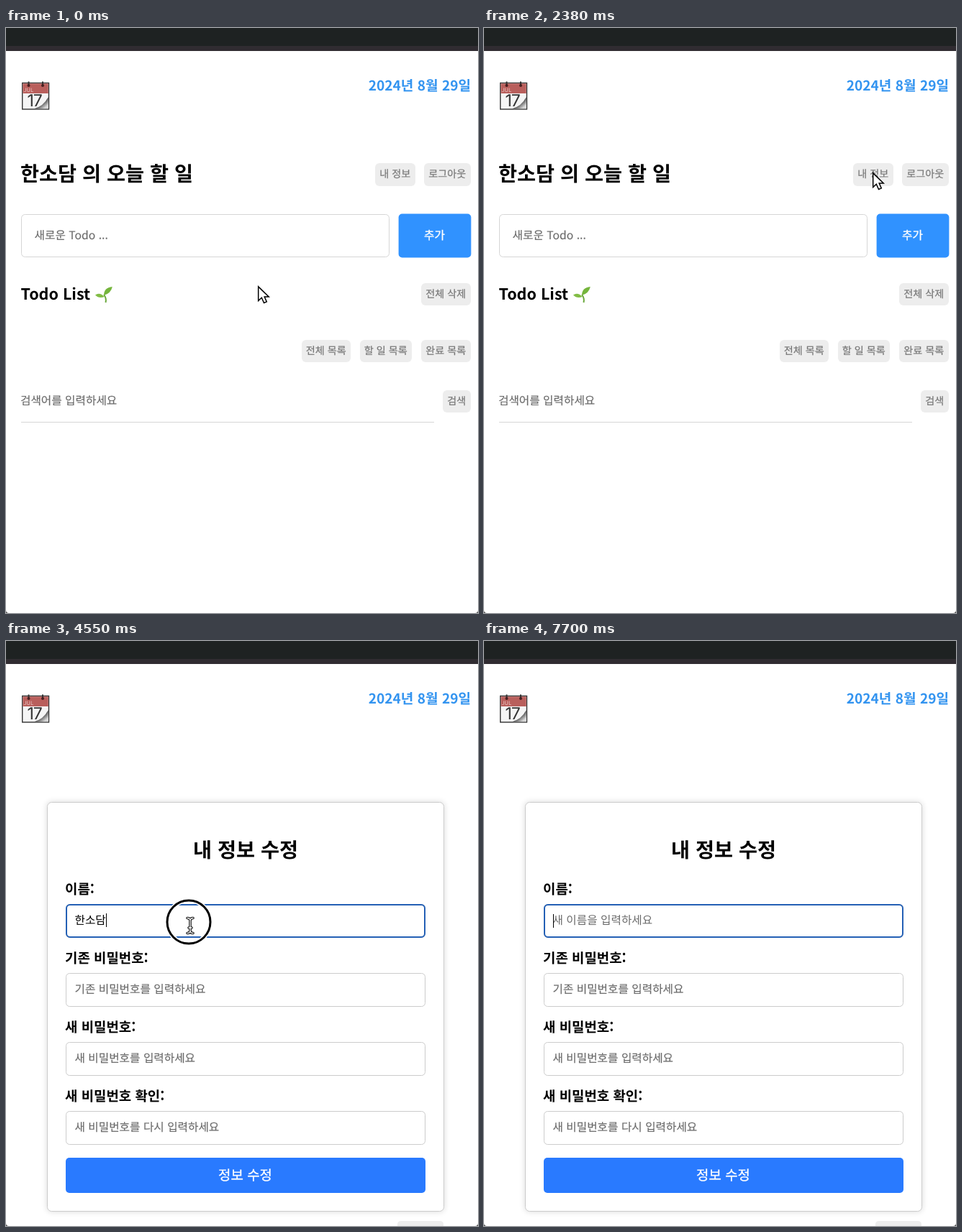
Recreate the animation shown at these times as an HTML page. Size 656 by 814 pixels, loop 8000 ms.

```html
<!DOCTYPE html>
<html lang="ko">
<head>
<meta charset="utf-8">
<title>Todo</title>
<style>
html, body { margin: 0; width: 100%; height: 100%; overflow: hidden; background: #fff; }
svg { display: block; font-family: "Noto Sans CJK KR", "Noto Sans CJK", "Noto Sans CJK JP", sans-serif; }
text { text-rendering: geometricPrecision; }
.bold { font-weight: 700; }
.hint { font-size: 15.7px; fill: #6b6b6b; stroke: #6b6b6b; stroke-width: .15; }
.small { font-size: 14.15px; fill: #777; stroke: #777; stroke-width: .2; text-anchor: middle; }
.label { font-size: 18.9px; font-weight: 700; }
.head { font-size: 28.3px; font-weight: 700; }
.field { fill: #fff; stroke: #ccc; }
.focus { fill: none; stroke: #2460b5; stroke-width: 2; }
.center { text-anchor: middle; fill: #fff; stroke: #fff; stroke-width: .35; }
</style>
</head>
<body>
<svg width="656" height="814" viewBox="0 0 656 814">
  <defs>
    <linearGradient id="curl" x1="0" y1="0" x2="1" y2="1">
      <stop offset=".35" stop-color="#ddd"/>
      <stop offset=".55" stop-color="#555"/>
      <stop offset=".85" stop-color="#d8d8d8"/>
    </linearGradient>
    <filter id="soft" x="-5%" y="-5%" width="110%" height="110%"><feGaussianBlur stdDeviation="4"/></filter>
  </defs>
  <rect width="656" height="814" fill="#fff"/>
  <rect width="656" height="26" fill="#1e2222"/>
  <rect y="25" width="656" height="7" fill="#302c31"/>

  <g id="calendar">
    <rect x="22.7" y="76.5" width="36.8" height="36.5" fill="#f5f5f5" stroke="#333" stroke-width="1.4"/>
    <path d="M23.4 77.2H58.8V91H23.4Z" fill="#b95f5c"/>
    <path d="M31.5 74.5v5M51 74.5v5" stroke="#333" stroke-width="2"/>
    <circle cx="31.5" cy="80" r="2" fill="#471f1f"/><circle cx="51" cy="80" r="2" fill="#471f1f"/>
    <path d="M39 112.3Q52 109 58.8 96V112.3Z" fill="url(#curl)"/>
    <text x="24.5" y="89" font-size="7.5" fill="#ecc9c7">JUL</text>
    <text x="29.5" y="109" font-size="23" letter-spacing="-1" fill="#333" style="font-family:Inter,sans-serif">17</text>
  </g>
  <text class="bold" x="646" y="86.5" font-size="19.1" text-anchor="end" fill="#3394f0">2024년 8월 29일</text>

  <g id="home">
    <text class="head" x="20" y="212.7"><tspan class="user"></tspan> 의 오늘 할 일</text>
    <rect class="field" x="21.5" y="259.5" width="511" height="59" rx="5" style="stroke:#d6d6d6"/>
    <rect class="focus" id="todoFocus" x="22" y="260" width="510" height="58" rx="5"/>
    <text class="hint" x="39.6" y="294">새로운 Todo ...</text>
    <rect x="545.6" y="258.6" width="100.8" height="60.8" rx="5" fill="#3092ff"/>
    <text class="center" x="595.5" y="293.5" font-size="15.7">추가</text>
    <text class="bold" x="20.5" y="378" font-size="21.5">Todo List</text>
    <g id="sprout">
      <path d="M138.5 382Q140 376 136 371" fill="none" stroke="#69a83a" stroke-width="2"/>
      <path d="M124 371.500Q130 367 137 374Q129 377 124 371.500Z" fill="#82bd45"/>
      <path d="M136 372Q136 361 147.800 360Q146 369 136 372Z" fill="#75b53c"/>
    </g>
    <text class="hint" x="20" y="523.5">검색어를 입력하세요</text>
    <path d="M21 548.5H595" stroke="#d6d6d6"/>
  </g>

  <g id="form">
    <rect x="57" y="224" width="552" height="570" rx="6" fill="#000" opacity=".15" filter="url(#soft)"/>
    <rect class="field" x="57.5" y="224.5" width="551" height="569" rx="6"/>
    <text class="head" x="333" y="300.5" text-anchor="middle">내 정보 수정</text>
    <rect x="83" y="719" width="500" height="49" rx="5" fill="#297aff"/>
    <text class="center" x="332.5" y="749.5" font-size="18.9">정보 수정</text>
    <path d="M544 814V812Q544 807 549 807H603Q608 807 608 812V814Z" fill="#ededed"/>
  </g>
  <g id="nameField">
    <rect class="focus" id="nameFocus" x="84" y="367" width="498" height="45" rx="5"/>
    <path id="spell" d="M96 397.5H139" stroke="#e8716f" stroke-width="2.6" stroke-dasharray="2.6 2"/>
    <text id="name" x="95.5" y="393.5" font-size="15.7"></text>
  </g>
  <rect id="caret" width="1" height="19"/>

  <g id="ring" fill="none">
    <circle stroke="#fff" stroke-width="6"/>
    <circle stroke="#000" stroke-width="3"/>
  </g>
  <path id="arrow" d="M.7 .9V20.5L5.3 16.3L8.5 23.5L12.3 21.9L9.2 15H15.2Z" fill="#fff" stroke="#000" stroke-width="1.5"/>
  <g id="beam" fill="none" stroke-linecap="round"></g>
  <path d="M0 810V814H4Q0 814 0 810M656 810V814H652Q656 814 656 810" fill="#444"/>
</svg>
<script>
const $ = id => document.getElementById(id);
const USER = '한소담', LOOP = 8000, STEP = 70;

const button = (x, y, w, h, label) =>
  `<rect x="${x}" y="${y}" width="${w}" height="${h}" rx="6" fill="#ededed"/>
   <text class="small" x="${x + w / 2 - 0.3}" y="${y + h / 2 + 4}">${label}</text>`;

$('home').insertAdjacentHTML('beforeend',
  button(513, 188, 56, 32, '내 정보') + button(581, 188, 65, 32, '로그아웃') +
  button(577, 355, 69, 31, '전체 삭제') + button(411, 434, 68, 31, '전체 목록') +
  button(492, 434, 72, 31, '할 일 목록') + button(577, 434, 69, 31, '완료 목록') +
  button(607, 504, 39, 31, '검색'));

const rows = [['이름:', ''], ['기존 비밀번호:', '기존 비밀번호를 입력하세요'],
  ['새 비밀번호:', '새 비밀번호를 입력하세요'], ['새 비밀번호 확인:', '새 비밀번호를 다시 입력하세요']];
$('form').insertAdjacentHTML('beforeend', rows.map(([label, hint], i) => {
  const y = 366 + 96 * i;
  return `<text class="label" x="82" y="${y - 14}">${label}</text>
    <rect class="field" x="83.5" y="${y + 0.5}" width="499" height="46" rx="5"/>
    <text class="hint" x="95.5" y="${y + 27.5}">${hint}</text>`;
}).join(''));
document.querySelector('.user').textContent = USER;

const beam = 'M-4-10.5Q0-10.5 0-7V7Q0 10.5-4 10.5M4-10.5Q0-10.5 0-7M0 7Q0 10.5 4 10.5M-2 3H2';
$('beam').innerHTML = [['#111', 3.6], ['#fff', 1.3]]
  .map(([color, width]) => `<path d="${beam}" stroke="${color}" stroke-width="${width}"/>`).join('');

// Pointer path: time, x, y
const path = [[0, 350, 359], [350, 511, 208], [420, 511, 208], [700, 535, 207], [770, 535, 207],
  [980, 536, 204], [1610, 536, 204], [1820, 543, 204], [2240, 543, 204], [2380, 540, 201],
  [2660, 540, 201], [3080, 256, 396], [4830, 256, 396], [5180, 211, 458], [5390, 211, 458],
  [5600, 199, 432], [LOOP, 199, 432]];
// Click rings: start, end, centre, radius
const clicks = [[1190, 1400, 535, 202, 28.3], [2240, 2380, 541, 201, 28.3], [4550, 4690, 254, 391, 30]];
// Spans in which the text caret is lit
const lit = [[1190, 1750], [2240, 2310], [4550, 5110], [5600, 6160], [6370, 7210], [7700, LOOP]];

const show = (id, on) => $(id).style.display = on ? '' : 'none';
const move = (id, x, y) => $(id).setAttribute('transform', `translate(${x} ${y})`);
const within = (t, a, b) => t >= a && t < b;

function pointerAt(t) {
  const i = Math.max(1, path.findIndex(p => p[0] >= t));
  const [t0, x0, y0] = path[i - 1], [t1, x1, y1] = path[i];
  const u = (t - t0) / (t1 - t0), e = u * u * (3 - 2 * u);
  return [x0 + (x1 - x0) * e, y0 + (y1 - y0) * e];
}

function draw(t) {
  const modal = t >= 2450;
  show('home', !modal);
  show('form', modal);
  show('nameField', modal);
  show('todoFocus', within(t, 1190, 2310));
  show('nameFocus', t >= 4550);
  show('spell', within(t, 4690, 6370));

  const left = t < 6370 ? 3 : t < 6510 ? 2 : t < 6650 ? 1 : 0;
  $('name').textContent = left ? USER.slice(0, left) : '새 이름을 입력하세요';
  $('name').setAttribute('fill', left ? '#000' : '#6b6b6b');

  show('caret', lit.some(([a, b]) => within(t, a, b)));
  $('caret').setAttribute('x', modal ? Math.floor(96 + 14.45 * left) : 40);
  $('caret').setAttribute('y', modal ? (left ? 379 : 380) : 280);

  const [x, y] = pointerAt(t);
  const overName = modal && x > 83 && x < 583 && y > 366 && y < 413;
  show('arrow', t < 6370 && !overName);
  show('beam', t < 6370 && overName);
  move('arrow', x, y);
  move('beam', x, y);

  const click = clicks.find(c => within(t, c[0], c[1]));
  show('ring', click);
  if (click) {
    const [, end, cx, cy, r] = click, last = t >= end - STEP;
    move('ring', cx, cy);
    for (const c of $('ring').children) c.setAttribute('r', last ? r * 0.8 : r);
    $('ring').setAttribute('opacity', last ? 0.5 : 1);
  }
}

const start = performance.now();
function tick() {
  const t = (performance.now() - start) % LOOP;
  draw(Math.floor(t / STEP) * STEP);
  requestAnimationFrame(tick);
}
tick();
</script>
</body>
</html>
```
